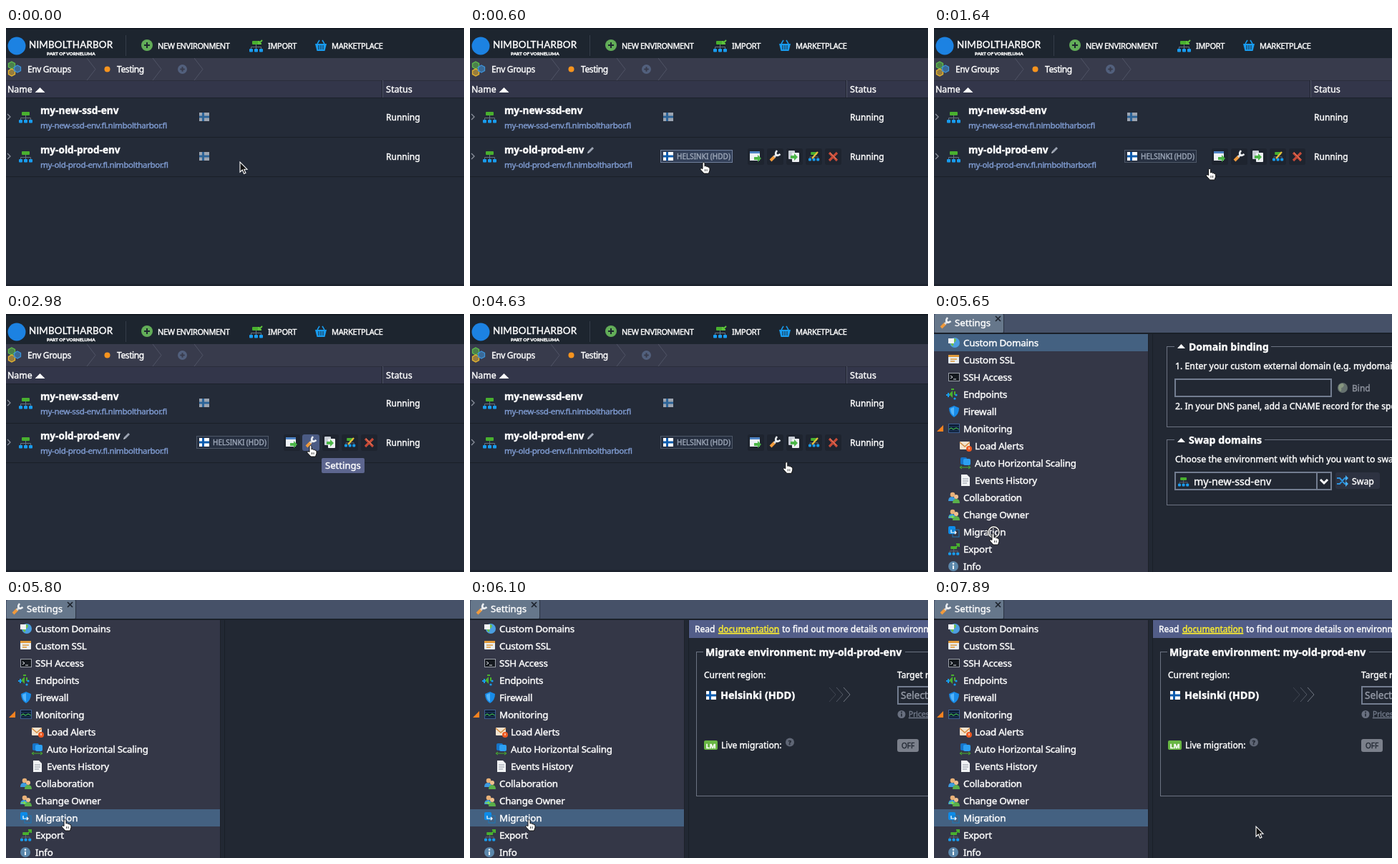
An HTML page that plays this animation: 640 by 360 pixels, repeating every 8000 ms.

```html
<!DOCTYPE html>
<html lang="en">
<head>
<meta charset="utf-8">
<title>Environment migration</title>
<style>
html, body { margin: 0; width: 100%; height: 100%; overflow: hidden; background: #232a36; }
svg { display: block; }
text { font-family: "Noto Sans", "Open Sans", sans-serif; white-space: pre; }
.logo { font-family: Lato, sans-serif; }
</style>
</head>
<body>
<svg id="stage" width="640" height="360" viewBox="0 0 640 360"></svg>
<script>
const LOOP = 8000;

// Drawing helpers, all returning SVG markup
const rect = (x, y, w, h, fill, more = '') =>
  `<rect x="${x}" y="${y}" width="${w}" height="${h}" fill="${fill}" ${more}/>`;
const box = (x, y, w, h, fill, stroke, sw = 1, r = 0) =>
  rect(x, y, w, h, fill, `stroke="${stroke}" stroke-width="${sw}" rx="${r}"`);
const dot = (x, y, r, fill, more = '') => `<circle cx="${x}" cy="${y}" r="${r}" fill="${fill}" ${more}/>`;
const shape = (d, fill, more = '') => `<path d="${d}" fill="${fill}" ${more}/>`;
const line = (d, color, w = 1) => `<path d="${d}" fill="none" stroke="${color}" stroke-width="${w}"/>`;
const at = (x, y, body, s = 1) => `<g transform="translate(${x} ${y}) scale(${s})">${body}</g>`;
const group = (id, body) => `<g id="${id}">${body}</g>`;
const text = (x, y, s, size = 12, fill = '#fff', gap = 0, more = '') =>
  `<text x="${x}" y="${y}" font-size="${size}" fill="${fill}" stroke="${fill}" stroke-width=".4" letter-spacing="${gap}" ${more}>${s}</text>`;
const bold = (x, y, s, size = 14, fill = '#fff', gap = 0) => text(x, y, s, size, fill, gap, 'font-weight="700"');

// Icons
const GREEN = '#49b02f', BLUE = '#189cf0';
const tree = (x, y, s = 1) => at(x, y,
  rect(4, 0, 11, 5, GREEN, 'rx="1"') + line('M9.5 5V12M2.5 12V8.500H16.500V12', '#667080') +
  [0, 7, 14].map(i => rect(i, 11, 5, 4.500, BLUE, 'rx="1"')).join(''), s);
const flag = (x, y, white = '#fff', blue = '#0e5cae') => at(x, y,
  rect(0, 0, 14, 12, white) + rect(4, 0, 3, 12, blue) + rect(0, 4.5, 14, 3, blue));
const wrench = (x, y) => at(x, y,
  line('M2 14L8 8', '#f09a3c', 4) + line('M7 9L11 5', '#d5d9de', 3) +
  line('M11 0Q8 4 10 6T15.500 5', '#eceff2', 2.6));
const people = (x, y) => at(x, y,
  dot(6, 4, 3.3, '#e8b078') + shape('M0 13Q0 7 5 7T10 13z', '#3d9be0') +
  dot(11, 7, 3, '#f0c090') + shape('M6 16Q6 10 11 10T16 16z', '#5ab04a'));
const hex = (x, y, c) => at(x, y, shape('M0 -5L4.500 -2.500V2.500L0 5L-4.500 2.500V-2.500z', c + '88', `stroke="${c}" stroke-width="1.300"`));
const plus = (x, y, r, c, ink) => dot(x, y, r, c) + line(`M${x - r / 2} ${y}h${r}M${x} ${y - r / 2}v${r}`, ink, 2);
const globe = (x, y, a, b) => dot(x, y, 7, a) + shape(`M${x - 5} ${y - 4}q5 -4 7 0q-1 4 -4 4q1 4 -1 5q-4 -3 -2 -9z`, b);
const arrowIcon = (x, y, c = '#4cb648') => shape(`M${x} ${y}h5v-3l5 5l-5 5v-3h-5z`, c);
const pencil = (x, y) => at(x, y, line('M2 8L8 2', '#9ba3b2', 3) + shape('M0 10L1 7L3 9z', '#d6dae2'));
const collapse = (x, y) => shape(`M${x} ${y}l5.500 -6l5.500 6z`, '#fff');

// Environment list page
const envRow = (y, name, host) =>
  line(`M2 ${y + 23}l4 4l-4 4`, '#8a909c', 1.3) + tree(18, y + 20) +
  bold(48, y + 23, name, 13.6) + text(48, y + 43, host, 11.6, '#7f9bd0', -.36) +
  text(531, y + 32, 'Running') + rect(0, y + 55, 640, 1, '#191f28');

const crumb = x => line(`M${x} 42L${x + 12} 57.500L${x} 73`, '#505466');
const button = x => rect(x, 168, 23, 23, '#1e242f', 'rx="3"');
const hoverParts =
  pencil(164, 165) + box(266.5, 170.5, 100, 17, '#273041', '#4e5868') +
  group('glow', box(266.5, 170.5, 100, 17, '#334059', '#70809c')) +
  flag(270, 173) + text(289, 183, 'HELSINKI (HDD)', 10, '#9da7b8') +
  [388, 415, 442, 469, 496].map(button).join('') +
  group('pressed', rect(414, 168, 24, 23, '#4b5b84', 'rx="3"')) +
  rect(391, 172, 14, 13, '#eef2f6') + rect(391, 172, 14, 3, '#4d83c4') + arrowIcon(397, 180) +
  wrench(418, 171) +
  rect(445, 171, 9, 12, '#c9ced6', 'rx="1"') + rect(450, 174, 10, 13, '#eef0f3', 'rx="1"') + arrowIcon(448, 178) +
  tree(473, 173, .8) + line('M478 182L486 173', '#e8c03c', 2.2) +
  line('M502 174L513 185M513 174L502 185', '#c64a38', 3.2) + line('M503 174L512 183', '#e88a6a', 1);

const host = 'fi.nimboltharbor.fi';
const listPage =
  rect(0, 0, 640, 360, '#242b38') + rect(0, 0, 640, 42, '#1d252f') + rect(0, 0, 640, 2, '#151b24') +
  rect(0, 42, 640, 31, '#383b4c') + rect(0, 73, 640, 24, '#33364a') +
  rect(0, 73, 640, 1, '#2a2d3b') + rect(0, 97, 640, 1, '#1b212b') + rect(525, 73, 1, 24, '#1f2430') +
  rect(526, 73, 1, 24, '#505466') +
  dot(15, 25, 12.5, '#1c82e2') +
  text(32, 28, 'NIMBOLTHARBOR', 13.4, '#fff', .2, 'class="logo"') +
  text(57, 38, 'PART OF VORNELUMA', 6.4, '#fff', 0, 'class="logo" font-weight="700"') +
  rect(167, 10, 1, 29, '#353d49') +
  plus(197, 24, 8, '#62ad58', '#1d252f') + text(212, 28.5, 'NEW ENVIRONMENT', 11, '#fff', -.42) +
  tree(340, 18) + line('M358 17L353 22M353 18v4h4', '#5fc33c', 2) + text(366, 28.5, 'IMPORT', 11, '#fff', -.32) +
  shape('M432 22H448L445.500 32H434.500z', BLUE) + line('M435 22L438 17M445 22L442 17', BLUE, 1.5) +
  line('M437 24v6M440 24v6M443 24v6', '#1d252f') + text(455, 28.5, 'MARKETPLACE', 11, '#fff', -.32) +
  hex(8, 52, '#5ebd4c') + hex(8, 62, '#e8b630') + hex(16, 57, '#3d93d8') +
  text(30, 62, 'Env Groups', 12, '#fff', -.38) + crumb(113) +
  dot(141.5, 57.5, 4, '#f7941e') + text(155, 62, 'Testing', 12, '#fff', -.4) + crumb(205) +
  plus(246.5, 57.5, 6.5, '#52607d', '#383b4c') + crumb(263) +
  text(2, 90, 'Name', 12.3) + shape('M47.500 83L54.500 90H40.500z', '#fff') + text(531, 90, 'Status', 12.6) +
  envRow(97, 'my-new-ssd-env', 'my-new-ssd-env.' + host) +
  envRow(152, 'my-old-prod-env', 'my-old-prod-env.' + host) +
  flag(270, 118, '#9da5b1', '#2d6498') +
  group('idleFlag', flag(270, 173, '#9da5b1', '#2d6498')) +
  rect(0, 357, 640, 3, '#1d232e') +
  group('hover', hoverParts) +
  group('tip', rect(441, 201, 60, 21, '#5d668f', 'rx="2"') + text(446, 216, 'Settings', 13.1));

// Settings page; each icon sits in a 16 px square
const card = c => rect(0, 1, 15, 12, '#e8edf0', 'rx="1"') + rect(0, 1, 15, 3, c) + line('M3 7h9M3 10h6', c, 1.5);
const menu = [
  ['Custom Domains', globe(9, 8, '#4b9ee0', '#6fc04c') + rect(0, 2, 8, 7, '#f2f4f6')],
  ['Custom SSL', card('#e09a3a')],
  ['SSH Access', box(.5, 2.5, 15, 11, '#15191f', '#9a9fa8') + line('M3 6l3 2l-3 2M7 11h4', '#dfe3e8')],
  ['Endpoints', line('M-3 9h5M0 6v6', BLUE, 2) + shape('M1 8l5 -5v10z', GREEN) + line('M4 1h4M9 4v5', GREEN, 2) + dot(11, 9, 1.6, BLUE) + dot(9, 14, 1.6, BLUE)],
  ['Firewall', shape('M8 0L15 3Q15 12 8 16Q1 12 1 3z', '#188be8') + shape('M8 2V14Q3 11 3 4z', '#53b4fa')],
  ['Monitoring', box(.5, 1.5, 15, 12, '#0c1a30', '#3f6295') + line('M1 5h14M1 11h14', '#25456f') + line('M1 9l3 -2l3 2l4 -2l4 2', '#3eaf52', 1.3)],
  ['Load Alerts', rect(0, 2, 14, 11, '#f1e3cf', 'rx="1"') + line('M0 3L7 9L14 3', '#d58b3e', 1.5) + dot(13, 12, 4, '#ee5a22') + rect(12.5, 10, 1, 3, '#fff'), 1],
  ['Auto Horizontal Scaling', rect(1, 0, 9, 10, '#1674c8', 'rx="2"') + rect(5, 2, 10, 9, '#2c9ff2', 'rx="2"') + line('M1 14h13M3 12l-3 2l3 2M12 12l3 2l-3 2', GREEN), 1],
  ['Events History', shape('M2 0H10L14 4V16H2z', '#f1f3f5') + line('M4 6h8M4 9h8M4 12h6', '#9198a3'), 1],
  ['Collaboration', people(0, 0)],
  ['Change Owner', people(0, 0) + line('M1 11h6l-2 -2M7 11l-2 2', '#7ee04c', 1.5)],
  ['Migration', rect(0, 0, 10, 11, '#0d8ce9', 'rx="2"') + box(6, 5, 9, 10, 'none', '#1d78b8') + line('M4 5v4h7M9 7l2 2l-2 2', '#fff', 1.2)],
  ['Export', at(0, 4, tree(0, 0, .8)) + line('M10 6L15 1M11 1h4v4', GREEN, 2)],
  ['Info', dot(7, 8, 7, '#5b87ab') + rect(6, 7, 2, 5, '#fff') + dot(7, 4.5, 1.2, '#fff')]
];
const menuItem = ([label, icon, sub], i) => {
  const x = sub ? 57 : 41, y = 40 + i * 24;
  return at(x - 21, y - 8, icon) + text(x, y + 5, label, 13.4, '#fff', -.22);
};

const BORDER = '#6c7382', PANEL = '#222833';
const fieldset = (x, y, h, gapX, gapW) =>
  box(x + .5, y + .5, 330, h, 'none', BORDER) + rect(gapX, y - 2, gapW, 5, PANEL);
const field = (x, y, w) => box(x, y, w, 24, PANEL, '#737d90', 2);

const domains =
  fieldset(325, 45, 112, 336, 135) + collapse(340, 48) + bold(356, 51, 'Domain binding', 14) +
  text(337, 77, '1. Enter your custom external domain (e.g. mydomain.com)', 12.3) +
  field(337, 91, 218) +
  globe(571, 103, '#66726f', '#87977f') + text(584, 108, 'Bind', 12, '#8d929d') +
  text(337, 133, '2. In your DNS panel, add a CNAME record for the specified domain', 12.25) +
  fieldset(325, 175, 91, 336, 126) + collapse(340, 179) + bold(356, 181, 'Swap domains', 14.2) +
  text(337, 207, 'Choose the environment with which you want to swap', 12.3) +
  field(337, 221, 218) + rect(534, 221, 2, 24, '#737d90') +
  tree(341, 228, .8) + text(363, 239, 'my-new-ssd-env', 14.2) + line('M540 231l5 5l5 -5', '#fff', 3) +
  rect(561, 221, 62, 23, '#2d3241', 'rx="3"') +
  line('M563 229h4l7 8h4M563 237h4l7 -8h4', '#2b91dc', 2) + shape('M575 225l4 4l-4 4zM575 233l4 4l-4 4z', '#47aef4') +
  text(584, 238, 'Swap', 12.3);

const migrate =
  rect(306, 28, 334, 25, '#525d88') + text(314, 45, 'Read') +
  text(347, 45, 'documentation', 12, '#fff02e', -.1, 'text-decoration="underline"') +
  text(436, 45, 'to find out more details on environment migration', 12.1) +
  fieldset(316, 72, 201, 326, 282) + bold(329, 78, 'Migrate environment: my-old-prod-env', 14.1) +
  text(327, 109, 'Current region:') + text(597, 109, 'Target region:') +
  flag(330, 127) + bold(350, 138, 'Helsinki (HDD)', 14.4) +
  ['#3f4551', '#555b67', '#747a85'].map((c, i) => line(`M${502 + i * 10} 122l9 10l-9 10`, c)).join('') +
  field(598, 121, 60) + text(602, 138, 'Select region', 13.7, '#969ca8') +
  dot(603, 159.5, 5.5, '#697080') + rect(602.2, 158.5, 1.6, 4, PANEL) + dot(603, 156.6, 1, PANEL) +
  text(613, 163, 'Prices', 10.2, '#727a8a', 0, 'text-decoration="underline"') +
  rect(327, 196, 19, 13, '#68b643', 'rx="2"') + bold(329.5, 206.5, 'LM', 9.5) +
  text(351, 207, 'Live migration:', 12.1) +
  dot(447, 198.5, 6, '#5f6675') + bold(444.7, 202, '?', 9, PANEL) +
  rect(597, 194, 30, 18, '#7b808b', 'rx="3"') + text(603, 207, 'OFF', 10, '#252b36');

const settingsPage =
  rect(0, 0, 640, 360, PANEL) + rect(0, 0, 640, 26, '#465168') +
  rect(1, 0, 96, 26, '#66778b', 'rx="2"') + rect(97, 0, 1, 26, '#2b3342') +
  rect(0, 26, 640, 2, '#1a2029') + wrench(8, 5) + text(29, 17, 'Settings', 13.2) +
  line('M86 3l7 7M93 3l-7 7', '#1c222c', 1.7) +
  rect(0, 28, 299, 332, '#343747') + rect(299, 28, 1, 332, '#1d212a') + rect(305, 28, 1, 332, '#1a1f28') +
  group('selected', rect(0, 0, 299, 24, '#446181')) +
  shape('M4 164h9v-9z', '#f58220') + menu.map(menuItem).join('') +
  group('domains', domains) + group('migrate', migrate);

const cursor =
  group('click', dot(2.5, -1.5, 7.5, 'none', 'stroke="#222" stroke-width="3"') +
    dot(2.5, -1.5, 7.5, 'none', 'stroke="#fff" stroke-width="1.500"')) +
  group('arrow', shape('M0 0V14L3.300 11L5.600 16.300L8 15.200L5.700 10.200H10z', '#111', 'stroke="#fff" stroke-width="1.100"')) +
  group('hand', shape('M0 1.500Q1.500 -1 3 1.500V6Q4.500 4.500 5.500 6.500Q7 5.500 8 7.300Q10 6.500 10 9V11.500L8.500 16H2L-3 10.500Q-3 7.500 0 9.500z', '#fff', 'stroke="#111" stroke-width="1"') +
    line('M3.500 10v3M6 10v3', '#111', .8));

stage.innerHTML = group('list', listPage) + group('settings', settingsPage) + group('cursor', cursor);

// Motion
const el = id => document.getElementById(id);
const fade = (id, a) => el(id).setAttribute('opacity', +a);
const move = (id, x, y) => el(id).setAttribute('transform', `translate(${x} ${y})`);
const mix = (a, b, p) => a + (b - a) * p;

// Progress in n equal jumps, the first at t0 and the last at t1
const steps = (t, t0, t1, n) =>
  t < t0 ? 0 : Math.min(n, Math.floor((t - t0) / (t1 - t0) * (n - 1) + 1e-6) + 1) / n;

function pointer(t) {
  if (t >= 5650) {
    const p = steps(t, 7450, 7890, 4), e = p * p * (3 - 2 * p);
    return [mix(81, 450, e), mix(306, 316, e), e === 0];
  }
  if (t >= 4630) {
    const e = steps(t, 4630, 5230, 5) ** 1.3;
    return [mix(424, 560, e), mix(183, 372, e), e < .2];
  }
  if (t < 450) return [327, 187, false];
  const e = 1 - (1 - steps(t, 1340, 2240, 7)) ** 1.6;
  return [mix(325, 424, e), mix(187, 183, e) + 47 * e * (1 - e), true];
}

function draw(now) {
  const t = now % LOOP, second = t >= 5650, picked = t >= 5800;
  const [x, y, hand] = pointer(t);
  const hover = t < 4780 ? steps(t, 450, 600, 2) : 0;
  fade('list', !second);
  fade('settings', second);
  fade('hover', hover);
  fade('idleFlag', 1 - hover);
  fade('glow', t < 1490);
  fade('pressed', t >= 2240 && t < 4630);
  fade('tip', t < 4630 ? steps(t, 2540, 2980, 4) : 0);
  move('selected', 0, picked ? 292 : 28);
  fade('domains', !picked);
  fade('migrate', t >= 6100);
  move('cursor', x, y);
  fade('hand', hand);
  fade('arrow', !hand);
  fade('click', second && !picked);
  requestAnimationFrame(draw);
}
draw(0);
</script>
</body>
</html>
```
